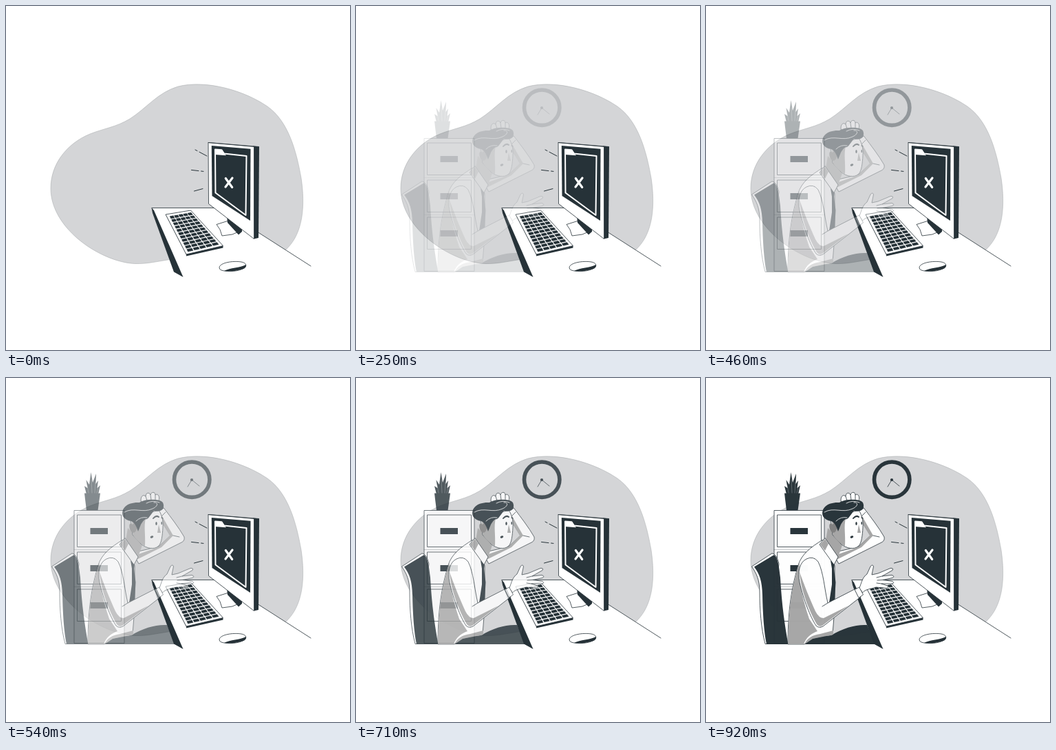
Recreate the animation shown at these times as an HTML page. Size 500 by 500 pixels, loop 1 s.

```html
<!DOCTYPE html>
<html lang="en">
<head>
<meta charset="utf-8">
<title>Desk scene</title>
<style>
  html, body { margin: 0; width: 100%; height: 100%; overflow: hidden; background: #fff; }
  svg { display: block; width: 100%; height: 100%; }
  .ln { fill: none; stroke: #263238; stroke-width: .8; stroke-linecap: round; stroke-linejoin: round; }
  .wh { fill: #fff; stroke: #263238; stroke-width: .8; stroke-linejoin: round; }
  .dk { fill: #263238; }
  .gr { fill: #a6a6a6; }
  .wl { fill: none; stroke: #fff; stroke-width: .8; stroke-linecap: round; }
  .fade { opacity: 0; }
</style>
</head>
<body>
<svg viewBox="0 0 500 500">
  <path fill="#d4d5d7" stroke="#a3a6a9" stroke-width=".5" d="M65 265C65 230 88 200 122 186C142 178 160 176 180 164C205 148 220 126 250 117C290 107 345 122 380 146C410 167 422 210 429 250C435 290 432 330 408 353C370 385 280 362 242 368C220 371 206 375 188 374.500C140 373 65 325 65 265Z"/>

  <g class="fade" id="clock">
    <circle cx="270.200" cy="147.700" r="25.700" fill="none" stroke="#263238" stroke-width="5.600"/>
    <path class="ln" d="M281 157L270 148L264 158"/>
    <circle class="dk" cx="270" cy="148" r="2.100"/>
  </g>

  <g class="fade" id="cabinet">
    <path class="dk" d="M114 167.500H137L133.500 192.500H117Z"/>
    <path class="dk" d="M117 169L114 157L118.500 160L116.500 148L121 155L123.500 137L126 152L131 139L130.500 154L134 149L132.500 160L137 156L134 169Z"/>
    <path class="wl" style="stroke-width:.4;opacity:.6" d="M120 167L118 156M125 167L124 148M129 167L130 151M132 167L134 159"/>
    <rect class="wh" x="99" y="192.500" width="73" height="193"/>
    <g id="drawers"></g>
  </g>

  <g id="desk">
    <path fill="#fff" d="M212 293.500H311L443 378L257 394Z"/>
    <path class="ln" d="M212 293.500H311L443 378"/>
    <path class="dk" d="M211.500 293L215 297L257.500 394L244 386.500L213 301Z"/>
    <path class="dk" d="M232 303L262 361V363.500L315.500 351.500V349Z"/>
    <path class="wh" d="M232 303L268.500 297L315.500 348.500L262 361Z"/>
    <g id="keys"></g>
    <path class="wh" d="M306 317.500L322 312.500L338 328L329 332L314 334Q312 324 306 317.500Z"/>
    <path class="dk" d="M321 306L343 321V328L338 332.500L322 315Z"/>
    <path class="dk" d="M359 203.500L368 204.500L367 337L360.500 338.500Z"/>
    <path class="wh" d="M294 198.500L360.500 204.500V338.500L294.500 287.500Z"/>
    <path class="ln" d="M294 198.500L367.500 204.500"/>
    <path class="dk" d="M298.800 203L355.500 207.800L355 312L299.500 276Z"/>
    <path d="M304 208.500L313.500 209.200L317 214.500L349.500 218L348.500 304L304.500 271.500Z" fill="#263238" stroke="#fff" stroke-width="2" stroke-linejoin="round"/>
    <path fill="#fff" d="M303.500 208L314 209L317.500 214.500L320 217.300L304 216Z"/>
    <path class="wl" style="stroke-width:3.200" d="M319.300 250.500L328.700 263.500M329 250L319 263"/>
    <path class="ln" style="stroke-width:1" d="M275 209L278 210.500M281 212.200L292 218M269.500 238.400L280 239.600M283.500 240L287 240.400M273.500 269L286 265.600"/>
    <path class="wh" d="M310 380C311 373 330 370 342 372C349 373 350 377 347 380C340 386 322 387 313 384Q310 383 310 380Z"/>
    <path class="dk" d="M317 385C326 380 340 381 349 376C350 380 346 382.500 340 383.500C333 385.500 325 386 317 385Z"/>
  </g>

  <g class="fade" id="man">
    <!-- chair -->
    <path class="wh" d="M66.500 274L96 254.800Q103 256 106 270L92 386.500H86C80 364 78 335 78 312C78 292 73 284 66.500 274Z"/>
    <path class="dk" d="M70 274.500L99 257C105 261 106 275 108 290C110 330 115 362 119.500 387H88C84 368 82.500 340 82 315C81.500 295 78 285 70 274.500Z"/>

    <!-- trousers -->
    <path class="dk" d="M140 387L150 377L182 374C200 363 218 358 234 359L246 387Z"/>

    <!-- raised arm and hand -->
    <path class="wh" d="M196 178C196 171 200 169 203 172C203 166 209 166 210 170C211 165 217 165 217 170C221 167 224 173 222 178L230 191L219 198L200 192Z"/>
    <path class="ln" d="M203 172L205 178M210 170L211 177M217 170L217 177"/>
    <path class="wh" d="M221 194L229.500 189C240 203 251 217 259 231Q260 236 256 238.500L193 270L184 254L222 245L239 229L224 205Z"/>
    <path class="gr" d="M223 203L227 201L243 229L226 246L190 264L187 258L221 246L238 229Z"/>
    <path class="ln" d="M224 203L232 195M243 229L252 231"/>

    <!-- torso -->
    <path class="wh" d="M170 235C152 246 139 256 134 272C126 300 119 330 119 387H143L155 379L184 372L187 335V273L180 250Z"/>
    <path class="gr" d="M136 267C126 300 119.500 330 119.500 386.500H142C146 377 152 372 162 368L150 350C141 322 134 298 136 267Z"/>
    <path class="gr" d="M157 261C169 280 172 303 173 330L184 324V350L166 363L156 330Z"/>
    <path class="gr" d="M143 387Q149 374 166 372L185 367V373L155 379Z"/>

    <!-- neck, collar, tie -->
    <path class="gr" d="M177 218L199 240L195 252L191 261L174 236Z"/>
    <path class="dk" d="M181 265L187 270L186 277L188.500 297L186 341L179 351L177 340L183 300L183 277Z"/>
    <path class="wh" d="M173 232.500L192 260L186 271.500L165 242Z"/>
    <path class="gr" d="M173 234L178 241L173 251L166 242Z"/>

    <!-- near arm -->
    <path class="wh" d="M146 263C136 268 133 281 136 297C142 323 152 348 160 360Q164 364 170 361L225 318L217 306.500L177 327C172 306 171 283 163 267Q156 258 146 263Z"/>
    <path class="gr" d="M136 282C137 304 148 335 161 358Q164 362 169 360L207 331L171 349Q164 349 159 339C150 319 142 299 136 282Z"/>
    <path class="ln" d="M177 327L169 332"/>
    <path class="wh" d="M216 307.500L223 304L228.500 315L222 319.500Z"/>

    <!-- open hand -->
    <path class="wh" d="M223 305C226 298 227 290 234 285L239 274Q242 270 243.500 274L241 286L250 284L268 276.500Q273 276 271 279.500L256 288L270 286.500Q275 288 271 290.500L257 293.500L271 295.500Q275 298 270 299L255 299L264 302Q266 305 262 305.500L247 304C240 307 233 306 227.500 312Z"/>
    <path class="ln" d="M256 288L248 290M257 293.500L249 294M255 299L248 298"/>

    <!-- head -->
    <path class="wh" d="M181 204L222 192C226 198 229 207 228 217C227.500 229 226 240 222 244C216 250 204 248 196 241L184 228Z"/>
    <path class="gr" d="M183 206L203 204C200 217 203 226 202 244C195 241 188 234 184 227Z"/>
    <path fill="#808080" d="M184 213C179 208 178 216 181 222C184 227 189 225 190 219C191 212 187 209 184 213Z"/>
    <path class="dk" d="M170 201C166 189 177 180 194 181C201 176 223 175 228 181C232 190 225 196 215 193C210 199 208 203 205 205C201 205 199 208 196 213L192 223Q188 210 182 208Q174 207 170 201Z"/>
    <path class="wl" d="M172 195C186 187 198 197 213 190C222 186 221 180 215 181M189 208Q196 201 205 203M204 182Q213 177 223 181"/>
    <path class="ln" style="stroke-width:2" d="M214 204Q218 199 222 202"/>
    <path class="ln" style="stroke-width:1.300" d="M226 203L228 204"/>
    <ellipse class="dk" cx="218.500" cy="211.500" rx="1.200" ry="2.500"/>
    <ellipse class="dk" cx="226.300" cy="211" rx=".8" ry="2.200"/>
    <path class="gr" d="M222 213L225 225L220 225Z"/>
    <ellipse class="dk" cx="212" cy="231" rx="2.400" ry="1.600" transform="rotate(-25 212 231)"/>
  </g>
</svg>
<script>
  const NS = 'http://www.w3.org/2000/svg';
  const add = (id, tag, attrs) => {
    const el = document.createElementNS(NS, tag);
    for (const k in attrs) el.setAttribute(k, attrs[k]);
    document.getElementById(id).append(el);
  };

  for (let i = 0; i < 3; i++) {
    const y = 199 + i * 54;
    add('drawers', 'rect', { class: 'wh', x: 103.5, y, width: 64, height: 46.5 });
    add('drawers', 'rect', { class: 'dk', x: 122.5, y: y + 19, width: 25.5, height: 9 });
  }
  add('drawers', 'path', { class: 'ln', d: 'M99 249.5H172M99 303.5H172', opacity: .35 });

  // keys sit on a grid laid over the slanted board
  const mix = (a, b, t) => [a[0] + (b[0] - a[0]) * t, a[1] + (b[1] - a[1]) * t];
  const at = (u, v) => mix(mix([237, 305], [269, 299.5], u), mix([264, 358], [310.5, 347], u), v);
  const cols = 5, rows = 11;
  let keys = '';
  for (let r = 0; r < rows; r++) {
    for (let c = 0; c < cols; c++) {
      const l = (c + .07) / cols, t = (r + .12) / rows;
      const right = (c + .93) / cols, b = (r + .88) / rows;
      const pts = [at(l, t), at(right, t), at(right, b), at(l, b)];
      keys += 'M' + pts.map(p => p.map(n => n.toFixed(2))).join('L') + 'Z';
    }
  }
  add('keys', 'path', { class: 'dk', d: keys });

  // held steps of a slow-in, slow-out fade
  const loop = 1000;
  const steps = [0, 40, 120, 170, 250, 330, 380, 420, 540, 580, 660, 710, 790, 920, loop];
  const ease = t => (1 - Math.cos(Math.PI * t)) / 2;
  const frames = steps.map(ms => ({
    offset: ms / loop, opacity: ease(ms / loop), easing: 'steps(1, end)'
  }));
  for (const el of document.querySelectorAll('.fade')) {
    el.animate(frames, { duration: loop, iterations: Infinity });
  }
</script>
</body>
</html>
```
